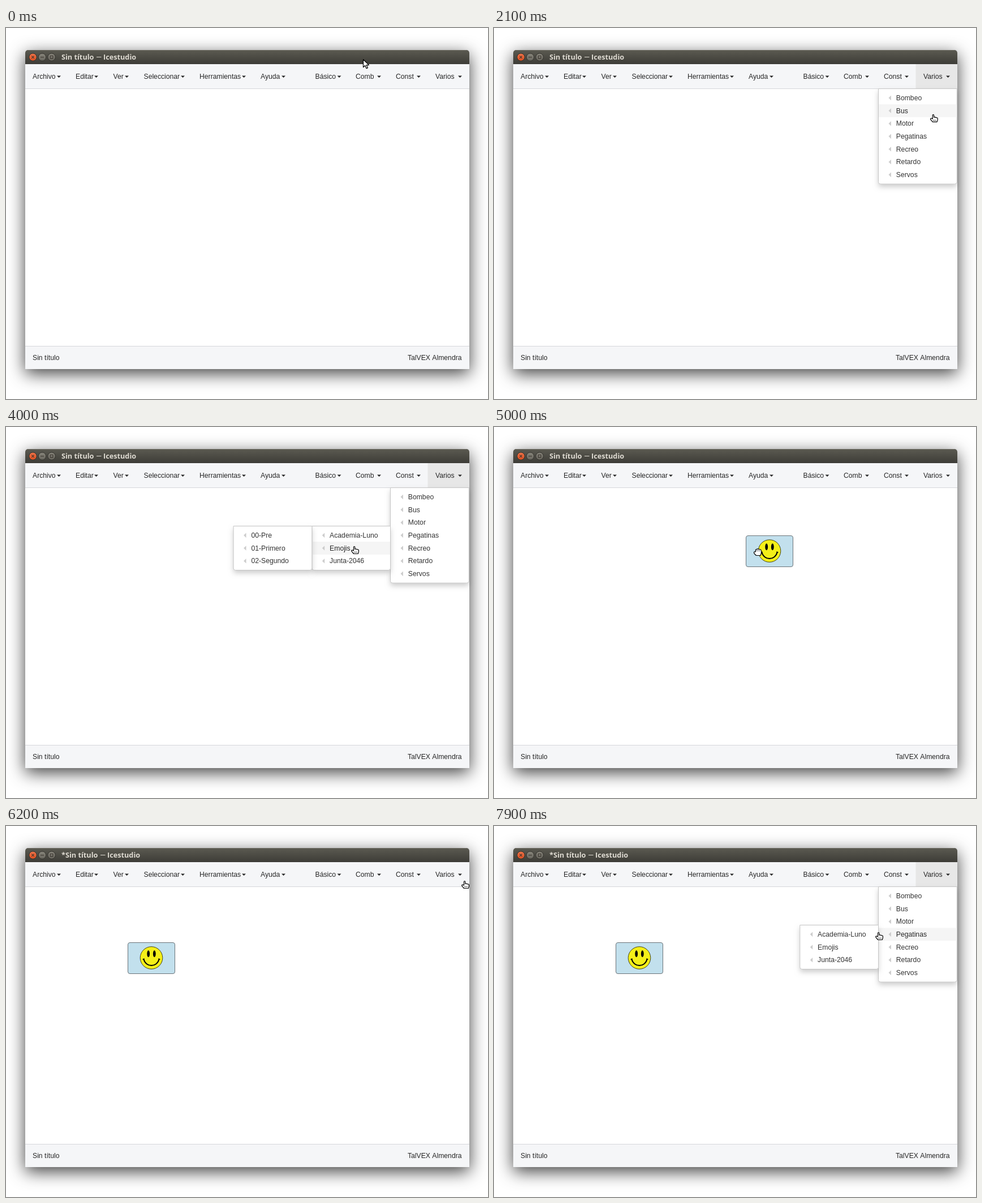
Write an HTML page with a canvas that moves like this. It is 852 px wide and 657 px high and loops after 8000 ms.

```html
<!DOCTYPE html>
<html lang="es">
<head>
<meta charset="utf-8">
<title>Icestudio</title>
<style>
html, body { margin: 0; width: 100%; height: 100%; overflow: hidden; background: #fff; }
canvas { display: block; }
</style>
</head>
<body>
<canvas id="stage" width="852" height="657"></canvas>
<script>
const ctx = document.getElementById('stage').getContext('2d');
const LOOP = 8000, TICK = 100;
const WIN = { x: 34, y: 39, w: 785, h: 565 };
const SANS = '12.2px "Liberation Sans", Arial, sans-serif';
const BOLD = 'bold 12.7px "Open Sans", "Noto Sans", sans-serif';
const ROW = 22.67, PAD = 5, MENU_W = 138.7;

// label, text x, caret x
const BAR = [
  ['Archivo', 47, 90], ['Editar', 123, 156], ['Ver', 189.5, 210],
  ['Seleccionar', 243.5, 309], ['Herramientas', 342, 417], ['Ayuda', 450, 487],
  ['Básico', 546.5, 585.5], ['Comb', 618, 656], ['Const', 689, 726], ['Varios', 759, 799]
];

const makeMenu = (level, row, items, leaf = false) => ({
  x: 679.5 - level * MENU_W, y: 107.5 + row * ROW,
  h: items.length * ROW + 2 * PAD, items, leaf
});
const VARIOS = makeMenu(0, 0, ['Bombeo', 'Bus', 'Motor', 'Pegatinas', 'Recreo', 'Retardo', 'Servos']);
const STICKERS = makeMenu(1, 3, ['Academia-Luno', 'Emojis', 'Junta-2046']);
const ACADEMY = makeMenu(2, 3, ['00-Pre', '01-Primero', '02-Segundo']);
const EMOJIS = makeMenu(2, 4, ['Feliz', 'Guiño', 'Triste'], true);

// menu, open from, open until
const OPEN = [
  [VARIOS, 1100, 5000], [STICKERS, 2900, 5000], [ACADEMY, 3600, 4100], [EMOJIS, 4100, 5000],
  [VARIOS, 6500, LOOP], [STICKERS, 7700, LOOP]
];

// first step, last step, pointer x, y
const MOVES = [
  [100, 100, 631, 54], [400, 800, 796, 87], [1100, 1100, 795.5, 86], [1700, 2400, 756, 193],
  [2900, 2900, 706, 189], [3000, 3100, 684, 189], [3300, 3400, 661, 189], [3600, 3600, 649, 189],
  [3800, 3800, 621, 208], [4000, 4000, 610, 211], [4400, 4500, 558, 214], [4800, 4900, 494, 215],
  [5000, 5000, 459, 215], [5200, 5200, 425, 215], [5400, 5500, 264, 229], [5800, 5800, 229, 229],
  [5900, 5900, 650, 154], [6100, 6200, 805, 97], [6400, 6500, 778, 88], [6800, 6800, 775, 104],
  [6900, 6900, 773, 120], [7100, 7300, 768, 180], [7500, 7500, 766, 190], [7700, 7900, 674, 188]
];

const ARROW = new Path2D('M.5 .8V14.5L3.7 11.5L6 16.6L8.4 15.6L6.1 10.6H10.5Z');
const HAND = new Path2D('M4.5 8V1.7Q4.5 .5 5.6 .5T6.8 1.7V5.2Q8.2 4.4 9 5.5Q10.3 4.9 11 6' +
  'Q13.4 5.6 13.4 7.6V10L12.2 13.5H4.6L1 9.2Q.2 7.6 1.6 7.1Q2.8 6.9 4.5 8Z');
const HAND_LINES = new Path2D('M5.8 9.8V11.6M7.9 9.8V11.6M10 9.8V11.6');
const FIST = new Path2D('M3.4 6V3.2Q3.6 1.5 5.2 2Q6.2 .2 7.8 1.4Q9.4 .4 10.4 2Q13.4 1.6 13.4 4.4' +
  'V8L12.2 12.5H4.4L1 9Q-.2 6.6 1.5 5.9Z');
const FIST_LINES = new Path2D('M5.8 3.4V5M8.1 3.2V5M10.5 3.6V5');

function pointerAt(t) {
  let x = 631, y = 55;
  for (const [first, last, tx, ty] of MOVES) {
    if (t < first) break;
    const start = first - TICK;
    const p = Math.min(1, (t - start) / (last - start));
    x += (tx - x) * p;
    y += (ty - y) * p;
  }
  return { x, y };
}

function text(str, x, y, color = '#262626', font = SANS, align = 'left') {
  ctx.font = font;
  ctx.fillStyle = color;
  ctx.textAlign = align;
  ctx.fillText(str, x, y);
}

function rect(x, y, w, h, color) {
  ctx.fillStyle = color;
  ctx.fillRect(x, y, w, h);
}

function polygon(color, ...points) {
  ctx.beginPath();
  points.forEach(([x, y]) => ctx.lineTo(x, y));
  ctx.fillStyle = color;
  ctx.fill();
}

function roundRect(x, y, w, h, r, fill, stroke) {
  ctx.beginPath();
  ctx.roundRect(x, y, w, h, r);
  if (fill) { ctx.fillStyle = fill; ctx.fill(); }
  if (stroke) { ctx.strokeStyle = stroke; ctx.lineWidth = 1; ctx.stroke(); }
}

function shadowed(color, blur, dy, draw) {
  ctx.save();
  ctx.shadowColor = color;
  ctx.shadowBlur = blur;
  ctx.shadowOffsetY = dy;
  draw();
  ctx.restore();
}

function line(path, color, width) {
  ctx.strokeStyle = color;
  ctx.lineWidth = width;
  ctx.stroke(path);
}

function drawButton(x, top, bottom, glyph) {
  const g = ctx.createLinearGradient(0, 44, 0, 59);
  g.addColorStop(0, top);
  g.addColorStop(1, bottom);
  ctx.beginPath();
  ctx.arc(x, 51.6, 6.7, 0, 7);
  ctx.fillStyle = g;
  ctx.fill();
  ctx.strokeStyle = '#33322d';
  ctx.lineWidth = 1;
  ctx.stroke();
  ctx.save();
  ctx.translate(x, 51.6);
  line(new Path2D(glyph), '#3a352f', 1.1);
  ctx.restore();
}

function drawWindow(dirty, active) {
  const { x, y, w, h } = WIN;
  rect(0, 0, 852, 657, '#fff');
  shadowed('rgba(0,0,0,.75)', 30, 8, () => roundRect(x, y, w, h, [5, 5, 0, 0], '#fff'));

  const g = ctx.createLinearGradient(0, 39, 0, 64);
  g.addColorStop(0, '#5b5a51');
  g.addColorStop(1, '#3d3c37');
  roundRect(x, y, w, 25, [5, 5, 0, 0], g);
  rect(x + 5, y, w - 10, 1, '#6a685f');
  drawButton(47.5, '#f2784f', '#dc4c1c', 'M-2.2 -2.2L2.2 2.2M2.2 -2.2L-2.2 2.2');
  drawButton(64, '#89877d', '#66645c', 'M-3 0H3');
  drawButton(80.6, '#89877d', '#66645c', 'M-2.3 -2.3H2.3V2.3H-2.3Z');

  const shift = dirty ? 7 : 0;
  const title = '#dfdbd2';
  text((dirty ? '*' : '') + 'Sin título', 98, 55.6, title, BOLD);
  rect(160 + shift, 51, 8.5, 1, title);
  text('Icestudio', 172 + shift, 55.6, title, BOLD);

  rect(x, 64, w, 43, '#f5f6f8');
  rect(x, 107, w, 1, '#d5d7da');
  if (active) rect(745.5, 64, 73.5, 43, '#e7e7e7');
  for (const [label, tx, cx] of BAR) {
    text(label, tx, 90);
    polygon('#262626', [cx, 84.6], [cx + 7, 84.6], [cx + 3.5, 88.1]);
  }

  rect(x, 563, w, 41, '#f5f6f8');
  rect(x, 563, w, 1, '#d5d7da');
  text('Sin título', 47, 588);
  text('TalVEX Almendra', 805.5, 588, '#262626', SANS, 'right');
}

function drawBlock(x, y) {
  roundRect(x + .5, y + .5, 83, 55, 3.5, '#c2e0ed', '#6b7378');
  ctx.save();
  ctx.translate(x + 42, y + 27.5);
  ctx.beginPath();
  ctx.arc(0, 0, 19.8, 0, 7);
  ctx.fillStyle = '#f4ef18';
  ctx.fill();
  ctx.strokeStyle = '#34330c';
  ctx.lineWidth = .9;
  ctx.stroke();
  ctx.fillStyle = '#000';
  for (const ex of [-5.3, 5.3]) {
    ctx.beginPath();
    ctx.ellipse(ex, -7.3, 2.4, 6, 0, 0, 7);
    ctx.fill();
  }
  line(new Path2D('M-13.6 2.2C-10 17.2 10 17.2 13.6 2.2'), '#000', 1.9);
  line(new Path2D('M-15.4 2.8L-12.4 1.4M15.4 2.8L12.4 1.4'), '#000', 1.3);
  ctx.restore();
}

function hoveredRow(menu, hot) {
  const inside = hot.x >= menu.x && hot.x < menu.x + MENU_W;
  return inside ? Math.floor((hot.y - menu.y - PAD) / ROW) : -1;
}

function drawMenu(menu, hot) {
  const { x, y, h, items, leaf } = menu;
  const radius = [0, 0, 3.5, 3.5];
  shadowed('rgba(0,0,0,.2)', 10, 5, () => roundRect(x, y, MENU_W, h, radius, '#fff'));
  roundRect(x, y, MENU_W, h, radius, '#fff', '#c6c6c6');
  const active = hoveredRow(menu, hot);
  items.forEach((label, i) => {
    const top = y + PAD + i * ROW;
    if (i === active) rect(x + .5, top, MENU_W - 1, ROW, '#f5f5f5');
    text(label, x + 31.3, top + 15.5, i === active ? '#262626' : '#333');
    const mid = top + ROW / 2;
    if (!leaf) polygon('#ccc', [x + 18, mid], [x + 22.4, mid - 4.3], [x + 22.4, mid + 4.3]);
  });
}

function drawPointer({ x, y }, shape, detail) {
  ctx.save();
  ctx.translate(x, y);
  ctx.lineJoin = 'round';
  ctx.fillStyle = '#fff';
  ctx.fill(shape);
  line(shape, '#000', 1.2);
  if (detail) line(detail, '#000', .9);
  ctx.restore();
}

function render(t) {
  const pos = pointerAt(t);
  const hot = { x: pos.x + 5.5, y: pos.y };
  const menus = OPEN.filter(([, from, to]) => t >= from && t < to).map(([menu]) => menu);
  const dragging = t >= 5000 && t < 5900;

  drawWindow(t >= 5800, menus.length > 0);
  if (dragging) drawBlock(Math.round(pos.x - 14), Math.round(pos.y - 23));
  else if (t >= 5900) drawBlock(215, 206);
  menus.forEach(menu => drawMenu(menu, hot));

  const onBar = hot.y > 64 && hot.y < 108;
  if (dragging) drawPointer(pos, FIST, FIST_LINES);
  else if (onBar || menus.length) drawPointer(pos, HAND, HAND_LINES);
  else drawPointer(pos, ARROW);
}

function loop() {
  const t = performance.now() % LOOP;
  render(Math.floor(t / TICK) * TICK);
  requestAnimationFrame(loop);
}
loop();
</script>
</body>
</html>
```
